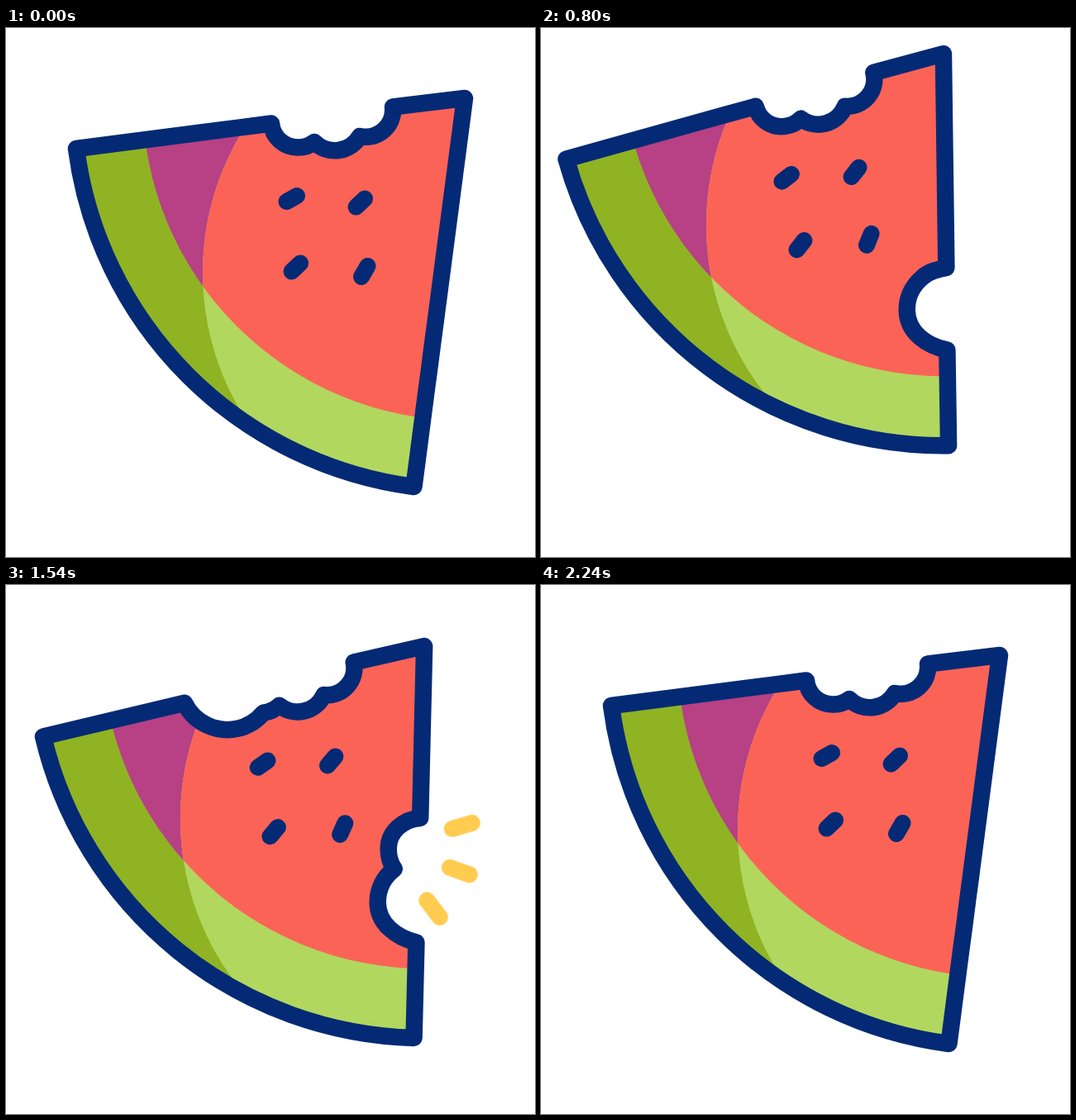
An HTML page that plays this animation: 640x640 px, repeating every 2400 ms.

```html
<!DOCTYPE html>
<html lang="en">
<head>
<meta charset="utf-8">
<title>Watermelon slice</title>
<style>
html, body { margin: 0; width: 100%; height: 100%; overflow: hidden; background: #fff; }
svg { display: block; width: 100vw; height: 100vh; }

.bob, .turn, .body {
  animation: 2400ms cubic-bezier(.333, 0, .667, 1) infinite;
}
.bob { animation-name: bob; }
.turn { animation-name: turn; transform-origin: 313px 545px; }
.body { animation-name: bite; }

.outline { fill: none; stroke: #042a75; stroke-width: 20.5; stroke-linejoin: round; }
.seeds { stroke: #042a75; stroke-width: 20; stroke-linecap: round; }

.flash {
  fill: none; stroke: #ffcc50; stroke-width: 20; stroke-linecap: round;
  stroke-dasharray: 1 3; opacity: 0;
  animation: flash 2400ms linear infinite;
}
.right { animation-delay: 440ms; }
.top { animation-delay: 1150ms; }
.upper { animation-delay: 1440ms; }

@keyframes bob {
  0%, 8.333% { translate: 0 0; }
  33.333% { translate: 0 -24px; }
  58.54% { translate: 0 24px; }
  75.42% { translate: 0 -23px; }
  93.333%, 100% { translate: 0 0; }
}

@keyframes turn {
  0%, 8.333% { rotate: 0deg; }
  29.167% { rotate: -10deg; }
  50% { rotate: 7deg; }
  70.833% { rotate: -10deg; }
  89.167%, 100% { rotate: 0deg; }
}

/* Rays grow outward, then leave at their outer ends. */
@keyframes flash {
  0% { stroke-dashoffset: 1; opacity: 1; }
  4.167%, 5.4% { stroke-dashoffset: 0; opacity: 1; }
  9.6% { stroke-dashoffset: -1; opacity: 1; }
  9.61%, 100% { stroke-dashoffset: -1; opacity: 0; }
}

/* Whole, right bite, top bite, upper right bite, whole again. */
@keyframes bite {
  0%, 14.167%, 89.167%, 100% {
    d: path("M85 146 L279.5 120.8 C293 119.1 307 117.3 321 115.5 C322.5 132 336.4 144.5 353 144.5 C360.5 144.5 367.2 142.7 373 138 A35 35 0 0 0 428 131 A33 33 0 0 0 468 95.5 L555 85 L523.1 328.9 C522 336.8 521 344.8 520 352.7 C518.8 361.6 517.6 370.6 516.4 379.5 C514.9 391.4 513.3 403.3 511.8 415.2 C510.6 424 509.5 432.7 508.3 441 L493.5 555 A474 474 0 0 1 85 146 Z");
  }
  18.333%, 44.167% {
    d: path("M85 146 L279.5 120.8 C293 119.1 307 117.3 321 115.5 C322.5 132 336.4 144.5 353 144.5 C360.5 144.5 367.2 142.7 373 138 A35 35 0 0 0 428 131 A33 33 0 0 0 468 95.5 L555 85 L521.5 341.7 C516 342 511 342.4 506 343.3 C500.5 344.3 495.5 346.3 491 349.2 C476.5 358 468.8 372 467 386 C463.5 412.8 485 432 508.3 440.4 L493.5 555 A474 474 0 0 1 85 146 Z");
  }
  48.125%, 56.667% {
    d: path("M85 146 L259.3 123.3 C268.4 148.2 293.5 163.7 319.8 160.8 C332.3 159.4 343.9 153.7 353 145 C360.5 144.5 367.2 142.7 373 138 A35 35 0 0 0 428 131 A33 33 0 0 0 468 95.5 L555 85 L521.5 341.7 C516 342 511 342.4 506 343.3 C500.5 344.3 495.5 346.3 491 349.2 C476.5 358 468.8 372 467 386 C463.5 412.8 485 432 508.3 440.4 L493.5 555 A474 474 0 0 1 85 146 Z");
  }
  60%, 73.333% {
    d: path("M85 146 L259.3 123.3 C268.4 148.2 293.5 163.7 319.8 160.8 C332.3 159.4 343.9 153.7 353 145 C360.5 144.5 367.2 142.7 373 138 A35 35 0 0 0 428 131 A33 33 0 0 0 468 95.5 L555 85 L528.6 291.2 C508 290.5 489.2 303.3 486.6 323.1 C485.3 333 487.5 343 491 349.2 C476.5 358 468.8 372 467 386 C463.5 412.8 485 432 508.3 440.4 L493.5 555 A474 474 0 0 1 85 146 Z");
  }
}
</style>
</head>
<body>
<svg viewBox="0 0 640 640">
  <defs>
    <clipPath id="slice"><path class="body"/></clipPath>
    <clipPath id="lit"><circle cx="567" cy="296" r="329"/></clipPath>
  </defs>
  <g class="bob">
    <g class="turn">
      <g clip-path="url(#slice)">
        <rect width="640" height="640" fill="#90b324"/>
        <circle cx="555" cy="85" r="390" fill="#b84084"/>
        <g clip-path="url(#lit)">
          <rect width="640" height="640" fill="#b2d75e"/>
          <circle cx="555" cy="85" r="390" fill="#fb6357"/>
        </g>
      </g>
      <path class="seeds" d="M339.5 210 L352 203 M423.5 216.5 L434 206.5 M345.5 294.5 L356 284.5 M430 301 L437.5 288"/>
      <path class="body outline"/>

      <g class="flash right">
        <path pathLength="1" d="M554 352 L576 340.4"/>
        <path pathLength="1" d="M563 397.8 L587.8 400.3"/>
        <path pathLength="1" d="M545.3 442.2 L564 458.8"/>
      </g>
      <g class="flash top">
        <path pathLength="1" d="M267 71 L253 50"/>
        <path pathLength="1" d="M316.4 56.5 L316.4 32"/>
        <path pathLength="1" d="M366 71 L379.6 50"/>
      </g>
      <g class="flash upper">
        <path pathLength="1" d="M565.6 308.1 L590.2 303.6"/>
        <path pathLength="1" d="M557.8 354.5 L580.8 365.4"/>
        <path pathLength="1" d="M526.4 391 L539.7 413"/>
      </g>
    </g>
  </g>
</svg>
</body>
</html>
```
